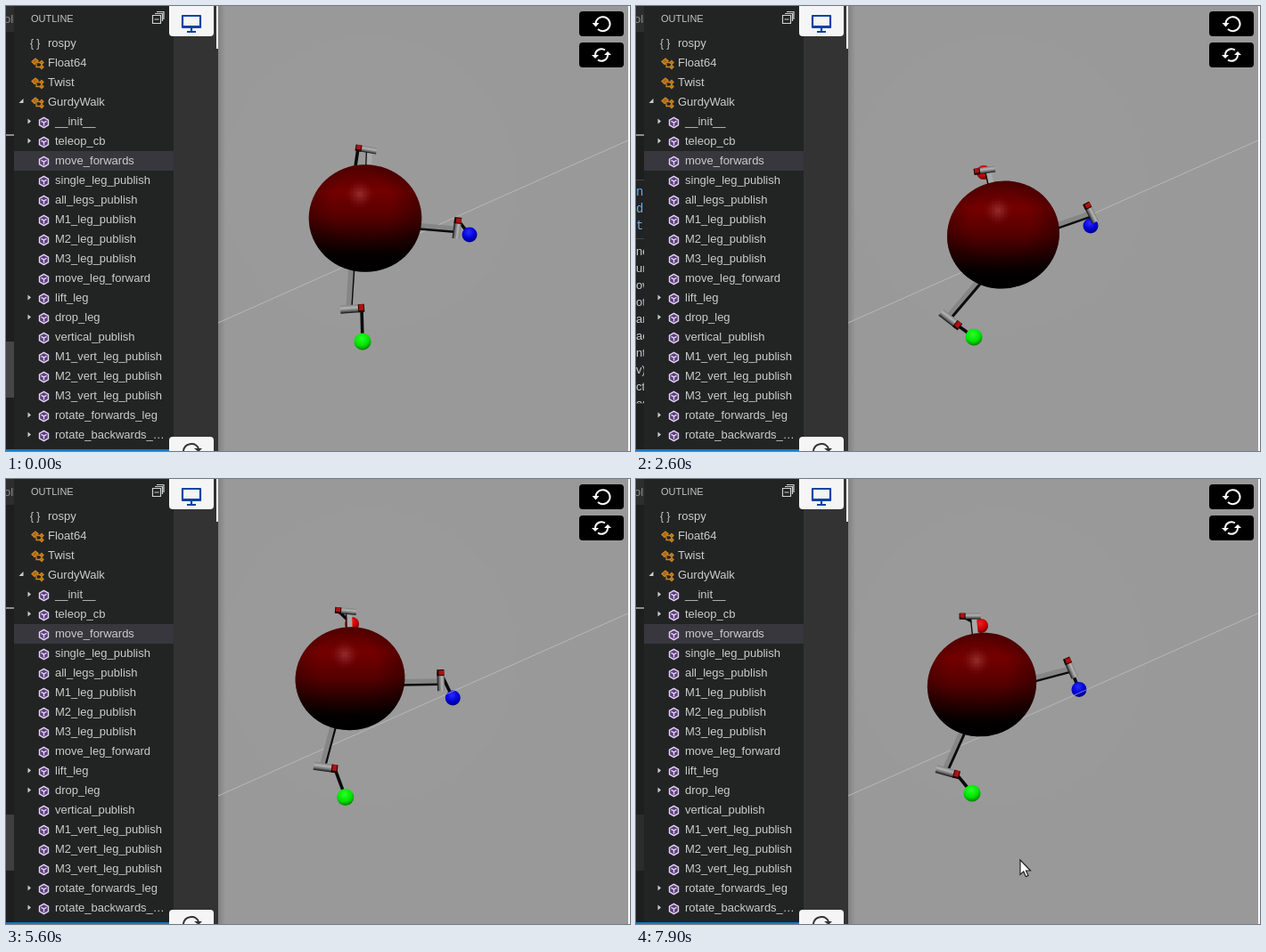
Animation, 700 px wide and 500 px high, one loop 8000 ms. Source, as an HTML page with a canvas:

```html
<!DOCTYPE html>
<html lang="en">
<head>
<meta charset="utf-8">
<title>Walking robot</title>
<style>
  html, body { margin: 0; width: 700px; height: 500px; overflow: hidden; background: #333; }
  body { position: relative; font: 13px/22px "Liberation Sans", Arial, sans-serif; color: #ccc; }
  canvas, svg, div { position: absolute; }
  svg { left: 0; top: 0; }
  #strip { left: 0; top: 0; width: 9px; height: 500px; overflow: hidden; background: #1e1e1e; white-space: pre; }
  #tab { left: 0; top: 0; width: 9px; height: 29px; background: #2d2d2d; color: #8a8a8a; line-height: 29px; text-indent: -2px; }
  #rule { top: 144px; width: 9px; height: 2px; background: #8c8c8c; }
  #thumb { top: 377px; width: 9px; height: 63px; background: #464646; }
  .pop { left: 0; width: 9px; box-sizing: border-box; overflow: hidden; background: #212223; border: solid #454545; border-width: 1px 0; line-height: 19px; }
  .mono { font: 14px/19px "Liberation Mono", "DejaVu Sans Mono", monospace; }
  #doc { top: 195px; height: 252px; }
  #doc .mono { top: 4px; color: #6ab0e8; }
  #doc .prose { top: 65px; padding-top: 4px; border-top: 1px solid #454545; width: 9px; }
  #hint { top: 168px; height: 29px; color: #ce9178; }
  #hint .mono { left: -1px; top: 4px; }
  #outline { left: 9px; top: 0; width: 179px; height: 500px; background: #212423; }
  #title { left: 19px; top: 3px; font-size: 11px; color: #c4c4c4; }
  .row { left: 0; width: 179px; height: 22px; white-space: pre; }
  .row.on { background: #37373d; }
  .row span { position: absolute; }
  #mark { left: 236px; top: 0; width: 2px; height: 48px; background: #fff; }
  #status { left: 0; top: 498px; width: 188px; height: 2px; background: #0a7acc; }
</style>
</head>
<body>
<canvas id="view" width="700" height="500"></canvas>
<div id="strip">
  <div id="tab">oll</div><div id="rule"></div><div id="thumb"></div>
  <div id="doc" class="pop"><div class="mono">nc
di
t=</div><div class="prose">nd
ur
ow
ot
ar
ac
nts
v)
ctu
on</div></div>
  <div id="hint" class="pop"><div class="mono">me</div></div>
</div>
<div id="outline"><div id="title">OUTLINE</div></div>
<div id="mark"></div><div id="status"></div>
<svg width="700" height="500" fill="none">
  <defs>
    <g id="cube" stroke="#e6d6f6" stroke-width="1.4">
      <path d="M0-5.600 5-2.800V2.800L0 5.600-5 2.800V-2.800Z" fill="#5b3f78"/>
      <path d="M-3-1.600 0 0 3-1.600M0 0V3.600"/>
    </g>
    <g id="class" stroke="#cf8420" stroke-width="1.3">
      <path d="M-6-2-2-5.500 1-3-3 1Z" fill="#a8681a"/>
      <path d="M0-1H3M-1 0V4H3"/>
      <path d="M3-1 5-3 7-1 5 1ZM3 4 5 2 7 4 5 6Z" fill="#a8681a"/>
    </g>
  </defs>
  <g id="icons"></g>
  <path d="M164.500 10.500H173.500V19.500H164.500ZM166.500 15H171.500M167 8.500H175.500V17M169 6.500H177V15" stroke="#d0d0d0" stroke-width="1.2"/>
  <g fill="#f5f5f5">
    <path d="M183 0H233V30Q233 34 229 34H187Q183 34 183 30Z"/>
    <path d="M183 500V488Q183 484 187 484H229Q233 484 233 488V500Z"/>
  </g>
  <path d="M198 11H218V24H198ZM198 23H218M208 24V29M203 29H213" stroke="#0c43a3" stroke-width="2.200" stroke-linejoin="round"/>
  <path d="M199 500A9 9 0 0 1 216 497" stroke="#333" stroke-width="2"/>
  <path d="M211 497H220L216 501Z" fill="#333"/>
  <g fill="#000">
    <rect x="643" y="6" width="50" height="28" rx="4"/>
    <rect x="643" y="41" width="50" height="28" rx="4"/>
  </g>
  <g stroke="#fff" stroke-width="2">
    <path d="M661.500 20A8 8 0 1 1 664 26"/>
    <path d="M661 55A7 7 0 0 1 672 49.500M675 55A7 7 0 0 1 664 60.500"/>
  </g>
  <path d="M657.500 19H665.500L661.500 23.500ZM657 55H665L661 59ZM671 55H679L675 51Z" fill="#fff"/>
  <path id="cursor" d="M0 0V16.500L3.800 13 6.300 18.800 9 17.600 6.500 12H11.500Z" fill="#fff" stroke="#222" stroke-width="1.200"/>
</svg>
<script>
const $ = id => document.getElementById(id);
const TAU = Math.PI * 2, RAD = Math.PI / 180, LOOP = 8000, STEP = 100;

// First letter: "{" module, "c" class, "v" open class, ">" closed method, "-" method, "*" selected
const items = `{rospy
cFloat64
cTwist
vGurdyWalk
>__init__
>teleop_cb
*move_forwards
-single_leg_publish
-all_legs_publish
-M1_leg_publish
-M2_leg_publish
-M3_leg_publish
-move_leg_forward
>lift_leg
>drop_leg
-vertical_publish
-M1_vert_leg_publish
-M2_vert_leg_publish
-M3_vert_leg_publish
>rotate_forwards_leg
>rotate_backwards_…`.split("\n");
let icons = "";
items.forEach((item, i) => {
  const kind = item[0], y = 42 + 22 * i, top = "{cv".includes(kind);
  const row = document.createElement("div");
  row.className = kind === "*" ? "row on" : "row";
  row.style.top = y - 11 + "px";
  const brace = kind === "{" ? '<span style="left:18px;font-size:12px">{ }</span>' : "";
  row.innerHTML = `${brace}<span style="left:${top ? 38 : 46}px">${item.slice(1)}</span>`;
  $("outline").append(row);
  if (kind !== "{") icons += `<use href="#${top ? "class" : "cube"}" x="${top ? 35 : 42.5}" y="${top ? y + .5 : y + 1}"/>`;
  if (kind === ">") icons += `<path fill="#ccc" d="M24.500 ${y - 3.500}l3.500 3-3.500 3z"/>`;
  if (kind === "v") icons += `<path fill="#ccc" d="M19.500 ${y - 4}v5h-5z"/>`;
});
$("icons").innerHTML = icons;

// Each stride drops the body, turns it, then rises at the next home
const strides = [
  { drop: 750, turn: 1500, rise: 2600, twist: 1 },
  { drop: 3450, turn: 4350, rise: 5300, twist: .55 },
  { drop: 6450, turn: 7400, rise: LOOP, twist: .55 }
];
const homes = [[403, 238.5], [384, 217.5], [379, 212.5]];
const rises = strides.map(s => s.rise);
const hops = [strides[0].turn, ...rises];

// Knees are [x, y, cylinder angle] from the body centre; drop and twist are added to rest
const back = {
  color: ["#f02020", "#c80000", "#600000"], size: 8, len: 21, width: 7, side: -1,
  rest: [-8, -79, 10], drop: [-5, -5, -1], twist: [-17, 13, -17],
  hip: (x, y) => [x * .8, -56],
  feet: [[391, 187], [390, 187], [389, 161], [387, 165]]
};
const right = {
  color: ["#2a2aff", "#0000d4", "#000070"], size: 8.5, len: 21, width: 8, side: 1,
  rest: [104, 2, 97], drop: [-6, -22, -27], twist: [-4, -13, -7],
  hip: (x, y) => [58, y * .5 + 3],
  feet: [[520, 257], [510, 247], [505.5, 255.5], [497, 236.5]]
};
const front = {
  color: ["#2aff2a", "#00e400", "#007800"], size: 9.5, len: 24, width: 9, side: -1,
  rest: [-4, 101, 176], drop: [4, -1, -8], twist: [-51, 2, 50],
  hip: (x, y) => [x * .3 - 9, 54],
  feet: [[400, 377], [379, 372], [384.5, 362], [377, 353]]
};

const clamp = v => Math.max(0, Math.min(1, v));
function ease(t, start, time = 600) {
  const k = clamp((t - start) / time);
  return k * k * (3 - 2 * k);
}
const sum = f => strides.reduce((total, s) => total + f(s), 0);
const follow = (points, starts, t) => points[0].map((v, axis) =>
  points.slice(1).reduce((pos, p, i) => pos + (p[axis] - points[i][axis]) * ease(t, starts[i]), v));

const ctx = $("view").getContext("2d");
function line(x1, y1, x2, y2, width, color) {
  ctx.beginPath();
  ctx.moveTo(x1, y1);
  ctx.lineTo(x2, y2);
  ctx.lineWidth = width;
  ctx.strokeStyle = color;
  ctx.stroke();
}
function gradient(g, stops) {
  stops.forEach(([at, color]) => g.addColorStop(at, color));
  return g;
}
const radial = (x, y, r, ...stops) => gradient(ctx.createRadialGradient(x, y, 0, x, y, r), stops);
const linear = (x1, y1, x2, y2, ...stops) => gradient(ctx.createLinearGradient(x1, y1, x2, y2), stops);
const ground = color => line(238, 356, 700, 150, 1, color);

function drawScene() {
  ctx.fillStyle = "#999";
  ctx.fillRect(238, 0, 462, 500);
  ctx.beginPath();
  ctx.arc(408, 199, 165, 0, TAU);
  ctx.fillStyle = "#9a9a9a";
  ctx.fill();
  ctx.fillStyle = linear(238, 0, 246, 0, [0, "rgba(0,0,0,.16)"], [1, "rgba(0,0,0,0)"]);
  ctx.fillRect(238, 0, 8, 500);
  ground("#b7b7b7");
  ctx.fillStyle = "#fff";
  ctx.fillRect(698, 0, 2, 500);
}

function drawBall(x, y, { color: [light, mid, dark], size }) {
  ctx.beginPath();
  ctx.arc(x, y, size, 0, TAU);
  ctx.fillStyle = radial(x - 1, y - size * .35, size * 1.4, [0, light], [.6, mid], [1, dark]);
  ctx.fill();
}

function drawCylinder(x, y, angle, len, w) {
  const lit = angle > 120 ? -1 : 1;
  ctx.save();
  ctx.translate(x, y);
  ctx.rotate(angle * RAD);
  ctx.fillStyle = linear(0, -w / 2 * lit, 0, w / 2 * lit, [0, "#808080"], [.35, "#b4b4b4"], [.7, "#707070"], [1, "#111"]);
  ctx.fillRect(0, -w / 2, len, w);
  ctx.fillStyle = "#1a0505";
  ctx.fillRect(-3, -w / 2, 7, w);
  ctx.fillStyle = "#b01010";
  ctx.fillRect(-2, -w / 2 + (lit > 0 ? 0 : 2), 5, w - 2);
  ctx.restore();
}

function drawThigh(leg, cx, cy, mx, my) {
  const [hx, hy] = leg.hip(mx, my);
  const len = Math.hypot(mx - hx, my - hy);
  const nx = -(my - hy) / len * leg.side, ny = (mx - hx) / len * leg.side;
  const edge = leg === right ? 2.4 : 1.2 + clamp(Math.abs(mx - hx) / 22) * 1.8;
  const strip = (off, width, color) =>
    line(cx + hx + nx * off, cy + hy + ny * off, cx + mx + nx * off, cy + my + ny * off, width, color);
  strip(-1.5, 6, leg === back ? "#a8a8a8" : "#868686");
  strip(2, edge, "#0b0b0b");
}

function drawLeg(leg, t, cx, cy, bend, twist) {
  const [dx, dy, angle] = leg.rest.map((v, i) => v + leg.drop[i] * bend + leg.twist[i] * twist);
  const [fx, fy] = follow(leg.feet, hops, t);
  const reach = leg.len * .55;
  line(cx + dx, cy + dy, fx, fy, 3.6, "#0a0a0a");
  if (leg === back) drawBall(fx, fy, leg);
  drawThigh(leg, cx, cy, dx + Math.cos(angle * RAD) * reach, dy + Math.sin(angle * RAD) * reach);
  if (leg !== back) drawBall(fx, fy, leg);
  drawCylinder(cx + dx, cy + dy, angle, leg.len, leg.width);
  if (leg === right) {
    ctx.save();
    ctx.beginPath();
    ctx.arc(fx, fy, leg.size, 0, TAU);
    ctx.clip();
    ground("rgba(190,190,210,.65)");
    ctx.restore();
  }
}

function drawBody(x, y, tilt, shrink) {
  ctx.beginPath();
  ctx.ellipse(x, y, 63.3 - 1.8 * shrink, 60.3 - 2.3 * shrink, tilt * RAD, 0, TAU);
  ctx.fillStyle = linear(x, y - 60, x, y + 60,
    [0, "#540000"], [.25, "#740000"], [.5, "#540000"], [.7, "#260000"], [.84, "#060000"], [.92, "#000"]);
  ctx.fill();
  ctx.fillStyle = radial(x - 4, y - 12, 76, [.45, "rgba(0,0,0,0)"], [1, "rgba(0,0,0,.4)"]);
  ctx.fill();

  const hx = x - 6, hy = y - 27;
  ctx.fillStyle = radial(hx, hy, 17, [0, "rgba(205,120,120,.4)"], [.5, "rgba(190,80,80,.2)"], [1, "rgba(150,20,20,0)"]);
  ctx.fillRect(hx - 17, hy - 17, 34, 34);
  for (let d = -12; d <= 12; d += 4) {
    line(hx + d, hy - 12, hx + d, hy + 12, .6, "rgba(60,0,0,.15)");
    line(hx - 12, hy + d, hx + 12, hy + d, .6, "rgba(60,0,0,.15)");
  }
}

function render(now) {
  const t = Math.floor(now % LOOP / STEP) * STEP;
  const low = sum(s => ease(t, s.drop) - ease(t, s.rise));
  const turn = sum(s => ease(t, s.turn, 500) - ease(t, s.rise));
  const twist = sum(s => s.twist * (ease(t, s.turn, 500) - ease(t, s.rise)));
  const [homeX, homeY] = follow(homes, rises, t);
  const x = homeX - 7.5 * low + 16.5 * turn, y = homeY + 20 * low - 1.5 * turn;

  drawScene();
  for (const leg of [back, right, front]) drawLeg(leg, t, x, y, low * low, twist);
  drawBody(x, y, -18 * turn, ease(t, strides[0].rise));

  $("doc").style.opacity = ease(t, 1300, 300) - ease(t, 2700, 300);
  $("hint").style.opacity = ease(t, 4000, 300) - ease(t, 5300, 300);
  $("thumb").style.opacity = 1 - .65 * ease(t, 5300, 900);
  const enter = ease(t, 6700, 900);
  $("cursor").setAttribute("transform", `translate(${428 + 3 * enter} ${503 - 75 * enter})`);
}

let start;
function tick(now) {
  start ??= now;
  render(now - start);
  requestAnimationFrame(tick);
}
render(0);
requestAnimationFrame(tick);
</script>
</body>
</html>
```
